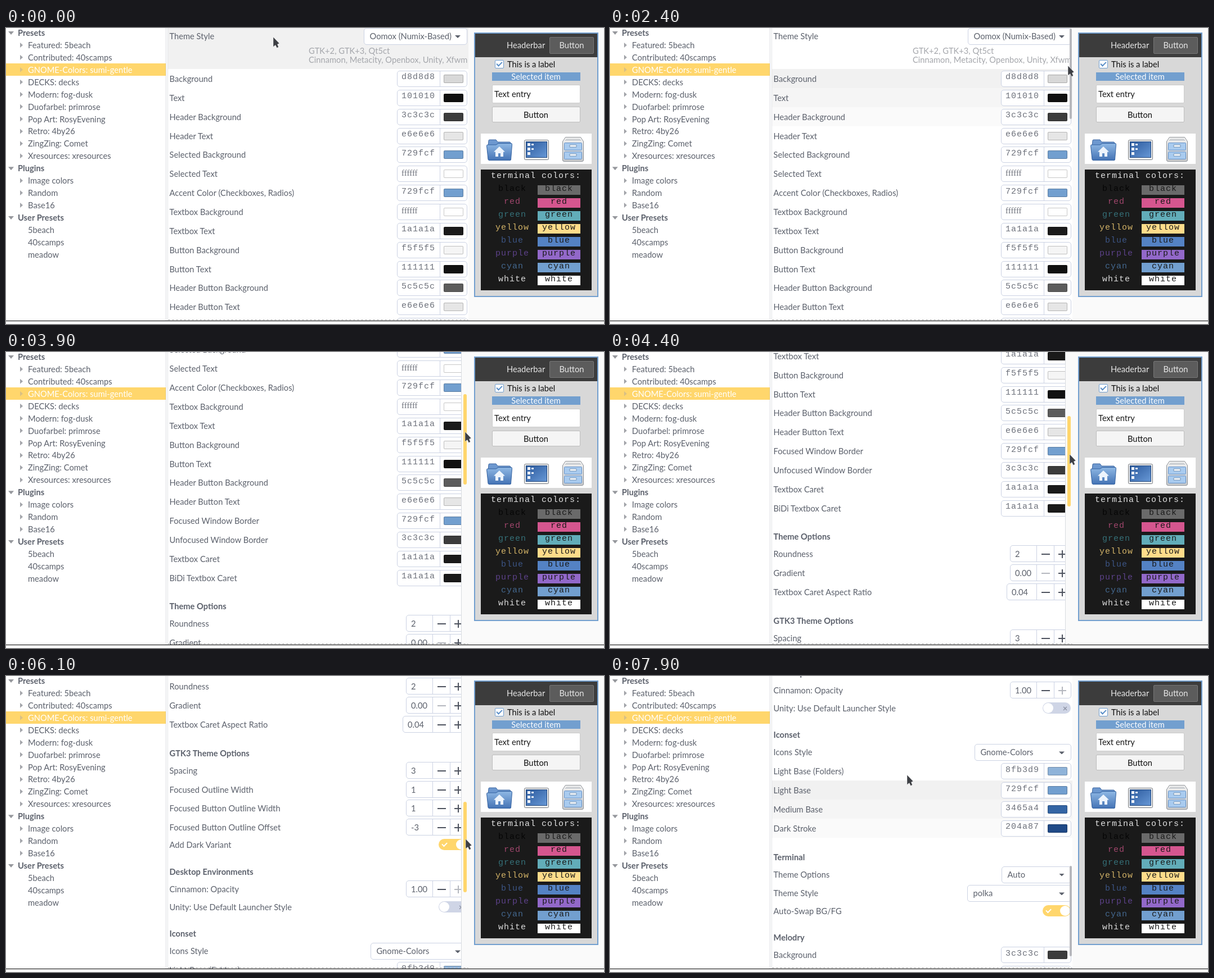
Recreate the animation shown at these times as an HTML page. Size 1063 by 527 pixels, loop 8 s.

```html
<!DOCTYPE html>
<html lang="en">
<head>
<meta charset="utf-8">
<title>Theme editor</title>
<style>
html, body { margin: 0; width: 100%; height: 100%; overflow: hidden; background: #fff; }
#stage { position: relative; width: 1063px; height: 527px; overflow: hidden; background: #fff;
  font: 14.7px/20px Lato, Carlito, sans-serif; color: #5c616c; }
#stage div { position: absolute; box-sizing: border-box; white-space: pre; }
#stage svg { position: absolute; overflow: visible; }
.bold { font-weight: 700; }
.mono { font: 15px/20px "Liberation Mono", monospace; letter-spacing: 1px; }
.thin { font: 15px/20px "Liberation Serif", serif; }
.mid { transform: translateX(-50%); }
.frame { border: 1px solid #cbd2e3; border-radius: 5px; background: #fff; }
.line { background: #cbd2e3; }
.down { background: #5c616c; clip-path: polygon(0 0, 100% 0, 50% 100%); }
.right { background: #a3a5aa; clip-path: polygon(0 0, 100% 50%, 0 100%); }
.tick { border: solid #fff; border-width: 0 0 2px 2px; transform: rotate(-45deg); }
.hover { background: #f1f1f1; opacity: 0; }
#view { left: 288px; top: 0; width: 534px; height: 521px; overflow: hidden; }
#list { left: -288px; top: 0; width: 822px; height: 1700px; }
#trough { left: 809px; top: 0; width: 13px; height: 521px; background: #fafafa; border-left: 1px solid #d9dbe0; }
#thumb { height: 161px; border-radius: 3px; }
#dash { left: 288px; top: 519px; width: 534px; height: 1px;
  background: repeating-linear-gradient(90deg, #a2a2a2 0 4px, transparent 4px 7px); }
</style>
</head>
<body>
<div id="stage">
  <div id="view"><div id="list"></div></div>
  <div id="trough"></div>
  <div id="thumb"></div>
  <div id="dash"></div>
</div>
<script>
const $ = id => document.getElementById(id);
const stage = $('stage'), list = $('list'), trough = $('trough'), thumb = $('thumb');

function box(parent, x, y, w, h, cls = '', css = '') {
  const e = document.createElement('div');
  e.className = cls;
  e.style.cssText = `left:${x}px;top:${y}px;width:${w}px;height:${h}px;${css}`;
  return parent.appendChild(e);
}
// Text is placed by its left edge (or centre with .mid) and its vertical centre.
function text(parent, x, cy, str, cls = '', color = '') {
  const e = document.createElement('div');
  e.className = cls;
  e.style.cssText = `left:${x}px;top:${cy - 10}px;${color && 'color:' + color}`;
  e.textContent = str;
  return parent.appendChild(e);
}
const fill = c => `background:${c};`;

// Sidebar
const tree = [
  '*Presets', '>Featured: 5beach', '>Contributed: 40scamps', '>GNOME-Colors: sumi-gentle',
  '>DECKS: decks', '>Modern: fog-dusk', '>Duofarbel: primrose', '>Pop Art: RosyEvening',
  '>Retro: 4by26', '>ZingZing: Comet', '>Xresources: xresources',
  '*Plugins', '>Image colors', '>Random', '>Base16',
  '*User Presets', ' 5beach', ' 40scamps', ' meadow'
];
box(stage, 0, 63, 284, 22, '', fill('#ffd66c'));
tree.forEach((item, i) => {
  const y = 8 + i * 21.93, kind = item[0], picked = i === 3;
  if (kind === '*') box(stage, 4, y - 2, 10, 6, 'down', fill('#96989d'));
  if (kind === '>') box(stage, 25, y - 4, 5, 9, 'right', picked ? fill('#d9c084') : '');
  text(stage, kind === '*' ? 21 : 39, y, item.slice(1), kind === '*' ? 'bold' : '', picked ? '#fff' : '');
});
box(stage, 284, 0, 1, 521, '', fill('#d9dbe0'));
box(stage, 287, 0, 1, 521, '', fill('#dfe1e5'));

// Settings list: kind | label | value | left edge of the control
const rows = `main|Theme Style|Oomox (Numix-Based)|636
hex|Background|d8d8d8
hex|Text|101010
hex|Header Background|3c3c3c
hex|Header Text|e6e6e6
hex|Selected Background|729fcf
hex|Selected Text|ffffff
hex|Accent Color (Checkboxes, Radios)|729fcf
hex|Textbox Background|ffffff
hex|Textbox Text|1a1a1a
hex|Button Background|f5f5f5
hex|Button Text|111111
hex|Header Button Background|5c5c5c
hex|Header Button Text|e6e6e6
hex|Focused Window Border|729fcf
hex|Unfocused Window Border|3c3c3c
hex|Textbox Caret|1a1a1a
hex|BiDi Textbox Caret|1a1a1a
head|Theme Options
spin|Roundness|2|711
spin|Gradient|0.00|711
spin|Textbox Caret Aspect Ratio|0.04|705
head|GTK3 Theme Options
spin|Spacing|3|711
spin|Focused Outline Width|1|711
spin|Focused Button Outline Width|1|711
spin|Focused Button Outline Offset|-3|711
toggle|Add Dark Variant|on
head|Desktop Environments
spin|Cinnamon: Opacity|1.00|711
toggle|Unity: Use Default Launcher Style|off
head|Iconset
combo|Icons Style|Gnome-Colors|648
hex|Light Base (Folders)|8fb3d9
hex|Light Base|729fcf
hex|Medium Base|3465a4
hex|Dark Stroke|204a87
head|Terminal
combo|Theme Options|Auto|696
combo|Theme Style|polka|635
toggle|Auto-Swap BG/FG|on
head|Melodry
hex|Background|3c3c3c
hex|Text|e6e6e6`.split('\n').map(r => r.split('|'));

// Space above and below the centre of a row
const space = { main: [16.93, 58.98], head: [33.7, 14.1], toggle: [14.2, 14.2] };

const controls = {
  hex(y, value) {
    box(list, 695, y - 14, 125, 29, 'frame');
    box(list, 771, y - 13, 1, 27, 'line');
    text(list, 703, y - 1.5, value, value === 'ffffff' ? 'thin' : 'mono', '#6d717b');
    box(list, 778, y - 7, 35, 15, '', fill('#' + value) + 'border:1px solid rgba(0,0,0,.22);border-radius:2px');
  },
  spin(y, value, x) {
    const faint = '#b4b7be', dark = '#4d525e';
    box(list, x, y - 15, 820 - x, 30, 'frame');
    box(list, 758, y - 14, 1, 28, 'line');
    box(list, 789, y - 14, 1, 28, 'line');
    text(list, x + 9, y, value);
    box(list, 767, y, 15, 2, '', fill(value === '0.00' ? faint : dark));
    const plus = fill(value === '1.00' ? faint : dark);
    box(list, 797, y, 14, 2, '', plus);
    box(list, 803, y - 6, 2, 14, '', plus);
  },
  combo(y, value, x) {
    box(list, x, y - 14, 820 - x, 30, 'frame');
    text(list, x + 10.5, y, value);
    box(list, 798, y - 1, 10, 5, 'down');
  },
  toggle(y, value) {
    const on = value === 'on';
    box(list, 769, y - 10, 50, 20, '', fill(on ? '#ffd66c' : '#cfd5e6') + 'border-radius:10px');
    box(list, on ? 800 : 770, y - 9, 18, 18, '', fill('#fff') + 'border-radius:9px');
    if (on) box(list, 775, y - 4, 9, 6, 'tick');
    else text(list, 809, y, '×', 'mid bold', '#8d93a5');
  },
  main(y, value, x) {
    controls.combo(y, value, x);
    text(list, 538, 40, 'GTK+2, GTK+3, Qt5ct', '', '#a5a7ac');
    text(list, 538, 56, 'Cinnamon, Metacity, Openbox, Unity, Xfwm', '', '#a5a7ac');
  },
  head() {}
};

let edge = -2.9;
const hovers = [];
for (const [kind, label, value, x] of rows) {
  const [above, below] = space[kind] || [16.93, 16.93];
  const top = edge, y = top + above;
  edge = y + below;
  if (kind !== 'head') {
    const el = box(list, 288, top, 534, edge - top, 'hover');
    hovers.push({ el, top, bottom: edge });
  }
  text(list, 290.5, y, label, kind === 'head' ? 'bold' : '');
  controls[kind](y, value, +x);
}

// Preview
box(stage, 822, 0, 241, 521, '', fill('#fafafa'));
box(stage, 832, 8, 221, 471, '', fill('#d8d8d8') + 'border:2px solid #729fcf');
box(stage, 834, 10, 217, 42, '', fill('#3c3c3c'));
text(stage, 890, 30, 'Headerbar', '', '#e6e6e6');
box(stage, 966, 16, 79, 30, '', fill('#5c5c5c') + 'border:1px solid #777;border-radius:2px');
text(stage, 1005.5, 30, 'Button', 'mid', '#e6e6e6');
box(stage, 869, 57, 16, 15, '', fill('#fff') + 'border:1px solid #729fcf;border-radius:2px');
box(stage, 872, 60, 10, 6, 'tick', 'border-color:#5b8fc8');
text(stage, 891, 64, 'This is a label', '', '#101010');
box(stage, 864, 79, 157, 15, '', fill('#729fcf'));
text(stage, 942, 86, 'Selected item', 'mid', '#fff');
box(stage, 864, 101, 157, 33, '', fill('#fff') + 'border:1px solid #cbcbcb;border-radius:2px');
text(stage, 868, 117, 'Text entry', '', '#1a1a1a');
box(stage, 864, 140, 157, 28, '', fill('#f5f5f5') + 'border:1px solid #bdbdbd;border-radius:2px');
text(stage, 942, 154, 'Button', 'mid', '#111');
box(stage, 844, 188, 197, 54, '', fill('#fff'));

stage.insertAdjacentHTML('beforeend', `
<svg style="left:844px;top:188px" width="197" height="54" viewBox="844 188 197 54">
  <defs>
    <linearGradient id="blue" x2="0" y2="1"><stop stop-color="#8fb8e4"/><stop offset="1" stop-color="#4473b5"/></linearGradient>
    <linearGradient id="deep" x2="1" y2="1"><stop stop-color="#2c5a9d"/><stop offset="1" stop-color="#6798d6"/></linearGradient>
    <linearGradient id="grey" x2="0" y2="1"><stop stop-color="#f4f4f4"/><stop offset="1" stop-color="#c8cacc"/></linearGradient>
  </defs>
  <path d="M857 212L858 200Q858 199 860 199H871L874 203H895Q897 203 897 205V212Z" fill="#6d98cf" stroke="#3a659f"/>
  <path d="M854.500 209.500Q854.500 208 856 208H871L875 205.500H898Q900 205.500 899.500 207.500L897.500 234Q897.500 235.500 896 235.500H859Q857.500 235.500 857 234Z" fill="url(#blue)" stroke="#315f9e"/>
  <path d="M877 211L867 220.500H870V229H875V223H879V229H884V220.500H887Z" fill="#edf4fc"/>
  <rect x="921.500" y="199.500" width="43" height="35" rx="2" fill="#f0f0f0" stroke="#73777c"/>
  <rect x="924.500" y="202.500" width="37" height="28" fill="url(#deep)" stroke="#23497f"/>
  <path d="M927 205h5v5h-5zM927 213h5v5h-5zM927 221h5v5h-5zM934 206h4v3h-4zM934 214h4v3h-4z" fill="#eef3fa"/>
  <path d="M994.500 194.500H1021.500L1026.500 202V235Q1026.500 237.500 1024 237.500H992Q989.500 237.500 989.500 235V202Z" fill="url(#grey)" stroke="#8b8f94"/>
  <path d="M996 197H1020L1023 201H993Z" fill="#d0d3d6"/>
  <g fill="#a9cbef" stroke="#638fc4">
    <rect x="992.500" y="204.500" width="31" height="13" rx="1"/>
    <rect x="992.500" y="220.500" width="31" height="13" rx="1"/>
  </g>
  <path d="M1002 208h12v4h-12zM1002 224h12v4h-12z" fill="#f7f9fb" stroke="#6f8fb3"/>
</svg>`);

// Terminal sample: name, dim colour, bright colour
box(stage, 844, 252, 197, 215, '', fill('#1a1a1a'));
text(stage, 862, 264, 'terminal colors:', 'mono', '#e2e2e2');
`black 060606 6a6a6a
red a0466c d5568f
green 357078 62adb9
yellow d3b367 ffdc8a
blue 3c5585 5482c4
purple 5d428a 9268c9
cyan 44688f 729fcf
white dcdcdc ffffff`.split('\n').forEach((line, i) => {
  const [name, dim, bright] = line.split(' '), y = 287 + i * 23;
  text(stage, 900, y, name, 'mono mid', '#' + dim);
  box(stage, 945, y - 7, 76, 17, '', fill('#' + bright));
  text(stage, 983, y, name, 'mono mid', '#1a1a1a');
});

box(stage, 0, 521, 1063, 1, '', fill('#000'));
stage.append(trough, thumb, $('dash'));
stage.insertAdjacentHTML('beforeend', `
<svg id="cursor" width="14" height="22" style="left:0;top:0">
  <path d="M0 0V17.500L4 14.500L6.500 19.500L9.500 18L7.500 13L11 11.500Z" fill="#3d3f44" stroke="#fff" stroke-opacity=".6" stroke-width=".8"/>
</svg>`);
const cursor = $('cursor');

// time, pointer x, pointer y, scroll offset
const track = [
  [0, 475, 16, 0], [200, 475, 16, 0], [700, 598, 119, 0], [1200, 598, 119, 0],
  [1300, 599, 165, 0], [1400, 600, 182, 0], [1600, 600, 190, 0], [1900, 600, 190, 0],
  [2400, 814, 67, 0], [3000, 814, 67, 0], [3400, 814, 101, 106], [4400, 817, 182, 354],
  [5100, 817, 230, 509], [6100, 817, 290, 695], [7400, 818, 404, 1049],
  [7500, 818, 352, 1049], [7600, 760, 270, 1049], [7900, 528, 176, 1049]
];
function pose(t) {
  t = Math.max(0, t);
  const i = track.findIndex(k => k[0] > t);
  if (i < 0) return track[track.length - 1].slice(1);
  const a = track[i - 1], b = track[i], p = (t - a[0]) / (b[0] - a[0]);
  return [1, 2, 3].map(n => a[n] + (b[n] - a[n]) * p);
}
const clamp = v => Math.min(1, Math.max(0, v));
const trail = [1, .7, .35, .1];

function draw(t) {
  const [x, y, scroll] = pose(t), s = Math.round(scroll);
  list.style.transform = `translateY(${-s}px)`;
  cursor.style.transform = `translate(${Math.round(x)}px,${Math.round(y)}px)`;

  // Highlights lag one step behind the pointer and fade out.
  const past = trail.map((w, k) => [w, ...pose(t - 100 * (k + 1))]);
  for (const { el, top, bottom } of hovers) {
    const hit = past.find(([, px, py, ps]) => px < 805 && py + ps >= top && py + ps < bottom);
    el.style.opacity = hit ? hit[0] : 0;
  }

  const wide = t >= 3100 && t < 7600;
  trough.style.display = wide ? '' : 'none';
  Object.assign(thumb.style, {
    left: wide ? '813px' : '817px',
    width: wide ? '6px' : '4px',
    top: Math.round(.5 + .322 * s) + 'px',
    background: wide ? '#ffd66c' : '#b6b7bc',
    opacity: .85 * clamp((t - 200) / 500) + .15 * clamp((t - 800) / 300)
  });
}

const loop = 8000, step = 100, start = performance.now();
function tick() {
  const t = (performance.now() - start) % loop;
  draw(Math.floor(t / step) * step);
  requestAnimationFrame(tick);
}
tick();
</script>
</body>
</html>
```
